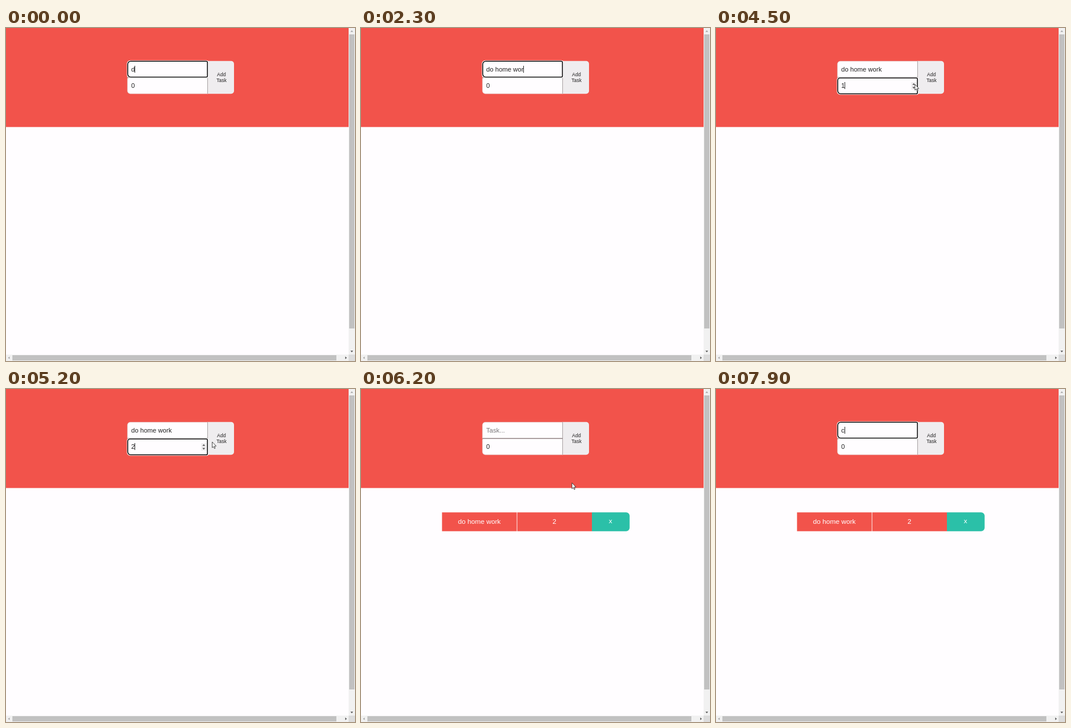
These frames come from a looping animation (600 px wide and 573 px high, 8000 ms). An HTML page with a canvas:

```html
<!DOCTYPE html>
<html lang="en">
<head>
<meta charset="utf-8">
<title>Task list</title>
<style>
html, body { margin: 0; width: 100%; height: 100%; overflow: hidden; background: #fffdff; }
canvas { display: block; }
</style>
</head>
<body>
<canvas id="stage" width="600" height="573"></canvas>
<script>
const ctx = document.getElementById('stage').getContext('2d');
const LOOP = 8000, STEP = 100;
const FONT = '"Liberation Sans", Arial, sans-serif';
const RED = '#f2534b', PAGE = '#fffdff', INK = '#222';
const TEXT_X = 215.3, TEXT_SIZE = 11.1;

// Each track is a list of [start, value]; values hold until the next start.
const taskText = [[0, 'd'], [800, 'do'], [900, 'do '], [1000, 'do h'], [1100, 'do ho'],
  [1200, 'do hom'], [1800, 'do home w'], [2000, 'do home wo'], [2300, 'do home wor'],
  [2600, 'do home work'], [5800, ''], [7900, 'c']];
const count = [[0, '0'], [4500, '1'], [5000, '2'], [5800, '0']];
const focus = [[0, 'task'], [4500, 'count'], [5600, ''], [7000, 'task']];
const caret = [[0, true], [3100, false], [3600, true], [4200, false], [4500, true],
  [7600, false], [7900, true]];
const spinner = [[0, false], [3700, true], [5400, false], [6400, true], [6600, false]];
const pointer = [[0, null], [4300, ['arrow', 342, 97]], [5100, ['arrow', 349, 94]],
  [5200, ['arrow', 354.5, 91]], [5300, ['hand', 361, 87]], [5400, ['hand', 366.5, 82.5]],
  [6000, ['hand', 367, 96]], [6100, ['arrow', 364, 140]], [6200, ['arrow', 362.7, 161.5]],
  [6300, ['arrow', 354, 130]], [6400, null]];

function at(track, t) {
  let value = track[0][1];
  for (const [start, v] of track) if (t >= start) value = v;
  return value;
}

function rect(x, y, w, h, color) {
  ctx.fillStyle = color;
  ctx.fillRect(x, y, w, h);
}

function round(x, y, w, h, radii, fill, stroke, width) {
  ctx.beginPath();
  ctx.roundRect(x, y, w, h, radii);
  if (fill) { ctx.fillStyle = fill; ctx.fill(); }
  if (stroke) { ctx.strokeStyle = stroke; ctx.lineWidth = width; ctx.stroke(); }
}

function poly(points, fill, stroke) {
  ctx.beginPath();
  points.forEach(([x, y]) => ctx.lineTo(x, y));
  ctx.closePath();
  ctx.fillStyle = fill;
  ctx.fill();
  if (stroke) { ctx.strokeStyle = stroke; ctx.lineWidth = 0.8; ctx.stroke(); }
}

function text(str, x, y, size, color, align = 'left') {
  ctx.font = size + 'px ' + FONT;
  ctx.textAlign = align;
  ctx.fillStyle = color;
  ctx.fillText(str, x, y);
}

// Small triangle pointing along (dx, dy).
function tri(x, y, dx, dy, r, color) {
  poly([[x + dx * r, y + dy * r], [x - dy * r * 1.2 - dx * r * 0.4, y + dx * r * 1.2 - dy * r * 0.4],
    [x + dy * r * 1.2 - dx * r * 0.4, y - dx * r * 1.2 - dy * r * 0.4]], color);
}

function drawScrollbars() {
  rect(589, 0, 11, 573, '#f1f1f1');
  rect(0, 562, 600, 11, '#f1f1f1');
  rect(590, 11, 9, 506, '#c1c1c1');
  rect(11, 563, 557, 9, '#c1c1c1');
  rect(589, 562, 11, 11, '#dcdcdc');
  tri(594.5, 6, 0, -1, 1.9, '#a3a3a3');
  tri(594.5, 556, 0, 1, 1.9, '#505050');
  tri(5.5, 567.5, -1, 0, 1.9, '#a3a3a3');
  tri(584, 567.5, 1, 0, 1.9, '#505050');
}

function drawRing(y, radii) {
  round(208.6, y - 0.4, 138.4, 28.6, radii, null, '#fff', 1.8);
  round(209.3, y + 0.3, 137, 27.2, radii, PAGE, '#101010', 1.6);
}

function drawCaret(str, y) {
  ctx.font = TEXT_SIZE + 'px ' + FONT;
  rect(Math.round(TEXT_X + ctx.measureText(str).width - 0.2), y, 0.9, 12, '#111');
}

function drawForm(t) {
  const task = at(taskText, t), num = at(count, t), field = at(focus, t);
  round(346, 56.8, 46, 56.4, [0, 5, 5, 0], '#efedef');
  round(208.7, 57, 138, 28.2, [5, 0, 0, 0], PAGE, '#d9a9a8', 0.6);
  round(208.7, 85.2, 138, 28, [2, 0, 0, 5], PAGE, '#d9a9a8', 0.6);
  rect(346.1, 57, 0.9, 56, '#a5a3a5');
  rect(209, 84.6, 137.6, 1, '#6d6b6d');
  if (field === 'task') drawRing(57, [5, 2, 2, 5]);
  if (field === 'count') drawRing(85.7, [4, 2, 2, 5]);

  if (task) text(task, TEXT_X, 74.5, TEXT_SIZE, INK);
  else text('Task...', TEXT_X, 74.5, TEXT_SIZE, '#7b797b');
  text(num, TEXT_X, 103, TEXT_SIZE, INK);
  if (at(caret, t)) {
    if (field === 'task') drawCaret(task, 65);
    if (field === 'count') drawCaret(num, 93);
  }
  if (at(spinner, t)) {
    rect(335.5, 93, 9, 13, '#efedef');
    tri(340, 97, 0, -1, 2, '#505050');
    tri(340, 102.2, 0, 1, 2, '#505050');
  }
  text('Add', 370.4, 83.4, 8.5, INK, 'center');
  text('Task', 370.4, 93.2, 8.5, INK, 'center');
}

function drawRow() {
  rect(139.3, 212.3, 128.4, 32.4, RED);
  rect(268.6, 212.3, 128.4, 32.4, RED);
  round(397, 212.3, 64.8, 32.4, [0, 6, 6, 0], '#2bc0a8');
  text('do home work', 203.5, 232, 11.7, '#fff', 'center');
  text('2', 332.6, 232, 11.7, '#fff', 'center');
  text('x', 429, 231.4, 11.7, '#fff', 'center');
}

const ARROW = [[0, 0], [0, 10], [2.3, 8], [3.8, 11.5], [5.3, 10.8], [3.8, 7.4], [6.8, 7.2]];
const HAND = [[-0.9, 0.6], [0, 0], [0.9, 0.6], [1, 4.6], [2.6, 4.7], [4.2, 5.3], [5.7, 6.2],
  [6, 9], [4.7, 11.6], [4.5, 13.8], [-0.7, 13.8], [-1.2, 11.9], [-4, 8.4], [-3.4, 7.4], [-0.9, 9]];

function drawPointer(state) {
  if (!state) return;
  const [kind, x, y] = state;
  ctx.save();
  ctx.translate(x, y);
  ctx.lineJoin = 'round';
  poly(kind === 'hand' ? HAND : ARROW, '#fff', '#222');
  ctx.restore();
}

function draw(now) {
  const t = Math.floor((now % LOOP) / STEP) * STEP;
  rect(0, 0, 600, 573, PAGE);
  rect(0, 0, 589, 170.4, RED);
  drawForm(t);
  if (t >= 5800) drawRow();
  drawScrollbars();
  drawPointer(at(pointer, t));
}

const began = performance.now();
function tick() {
  draw(performance.now() - began);
  requestAnimationFrame(tick);
}
tick();
</script>
</body>
</html>
```
